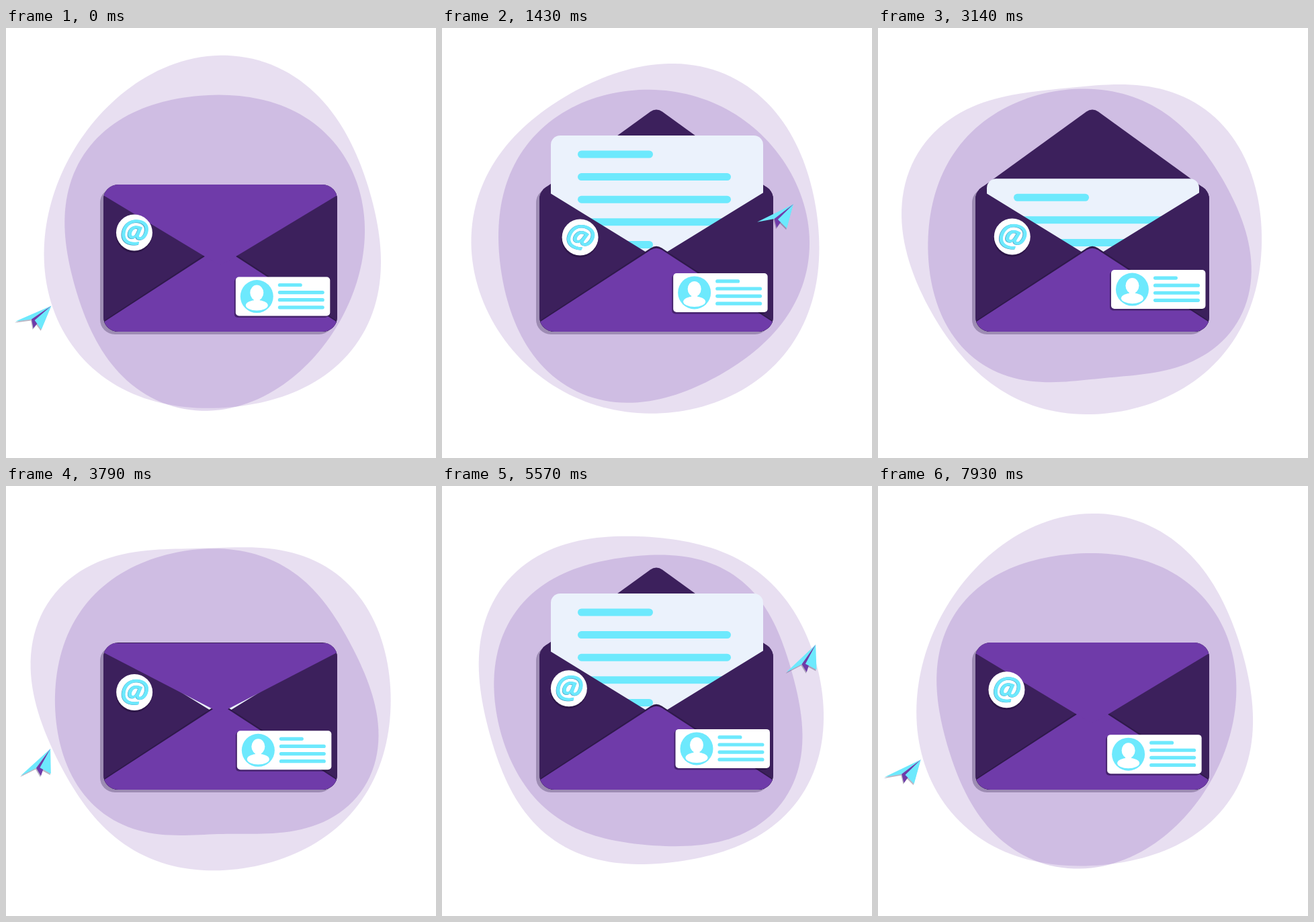
Recreate the animation shown at these times as an HTML page with a canvas. Size 640 px wide and 640 px high, loop 8 s.

```html
<!DOCTYPE html>
<html lang="en">
<head>
<meta charset="utf-8">
<title>Envelope</title>
<style>
html, body { margin: 0; width: 100%; height: 100%; overflow: hidden; background: #fff; }
canvas { display: block; width: 640px; height: 640px; }
</style>
</head>
<body>
<canvas id="stage" width="640" height="640"></canvas>
<script>
const ctx = document.getElementById('stage').getContext('2d');
const { sin, cos, PI } = Math;
const LOOP = 8000, CYCLE = 4000, FPS = 14;
const PURPLE = '#6f3ba9', DARK = '#3c205c', DEEP = '#2f194b', CYAN = '#6de9fd', PAPER = '#ebf2fc';
const SHADE = 'rgba(30,12,52,.5)', SOFT = 'rgba(60,45,85,.34)';

// Smooth step from 0 to 1 between times a and b.
function ease(t, a, b) {
  const p = Math.min(1, Math.max(0, (t - a) / (b - a)));
  return p * p * (3 - 2 * p);
}

function fill(color) {
  ctx.fillStyle = color;
  ctx.fill();
}

function polygon(color, points) {
  ctx.beginPath();
  points.forEach(([x, y]) => ctx.lineTo(x, y));
  ctx.closePath();
  fill(color);
}

function roundRect(color, x, y, w, h, r) {
  ctx.beginPath();
  ctx.roundRect(x, y, w, h, r);
  fill(color);
}

function ellipse(color, x, y, rx, ry = rx) {
  ctx.beginPath();
  ctx.ellipse(x, y, rx, ry, 0, 0, 7);
  fill(color);
}

function bar(x, y, w, h) {
  if (w > h) roundRect(CYAN, x, y - h / 2, w, h, h / 2);
}

// Triangle with a rounded tip at the middle of the envelope, on a base that reaches down to edge.
function flapShape(color, baseY, tipY, edge = baseY, left = 145) {
  const right = 638 - left;
  ctx.beginPath();
  ctx.moveTo(left, baseY);
  ctx.arcTo(319, tipY, right, baseY, 15);
  ctx.lineTo(right, baseY);
  ctx.lineTo(right, edge);
  ctx.lineTo(left, edge);
  ctx.closePath();
  fill(color);
}

// Circle bent by four slowly changing waves; turn rotates the whole outline.
function blob(a, size, turn, alpha) {
  const c = cos(a), s = sin(a), points = [];
  for (let i = 0; i < 180; i++) {
    const q = i * PI / 90, w = q - turn;
    const r = size + 3 * s
      - (2.3 + 4.2 * c - 1.5 * s) * sin(w)
      + (3 - 9.3 * c + s) * cos(2 * w) + (3 - 4.8 * c - 4.8 * s) * sin(2 * w)
      - (1.2 + c + 5.5 * s) * cos(3 * w) + (10 * c - 1.8 * s - 1) * sin(3 * w)
      + (2.2 * c + 1.8 * s - 3.2) * cos(4 * w) + (3.2 - 1.2 * c) * sin(4 * w);
    points.push([309 + r * cos(q), 319 + r * sin(q)]);
  }
  polygon(`rgba(111,59,169,${alpha})`, points);
}

// The nose follows an ellipse; the wing tips bank on the way out and turn for the way back.
function plane(t) {
  const a = 2 * PI * t / CYCLE + .183;
  const bank = Math.exp(-(((t - 560) / 330) ** 2));
  const turn = -2.6 * (ease(t, 1400, 2200) - ease(t, 3350, 3900));
  const left = [-54 + 8 * bank, 26 - 45 * bank], right = [-10 - 83 * bank, 36 - 12 * bank];
  const mix = (l, r) => [l * left[0] + r * right[0], l * left[1] + r * right[1]];
  const nose = [0, 0], leftRoot = mix(.48, .25), rightRoot = mix(.36, .37);
  const drop = .125 * (Math.hypot(...left) + Math.hypot(...right));
  const keel = [rightRoot[0] - 2, rightRoot[1] + drop];
  const faces = [[CYAN, nose, left, leftRoot], [PURPLE, nose, leftRoot, keel], [CYAN, nose, rightRoot, right]];
  ctx.save();
  ctx.translate(325 - 262 * cos(a), 297 + 126 * cos(a - .576));
  for (const shadow of [true, false]) {
    ctx.save();
    if (shadow) ctx.translate(-1, 2);
    ctx.rotate(turn);
    faces.forEach(([color, ...points]) => polygon(shadow ? SOFT : color, points));
    ctx.restore();
  }
  ctx.restore();
}

function letter(t) {
  const top = 237 - 77 * (ease(t, 600, 1150) - ease(t, 2720, 3290));
  roundRect(PAPER, 162, top, 316, 440 - top, [14, 14, 0, 0]);
  for (let i = 0; i < 5; i++) {
    const grow = ease(t, 560 + i * 70, 960 + i * 70) - ease(t, 3200, 3450);
    bar(202, top + 28 + 33.6 * i, (i % 4 ? 228 : 112) * grow, 11);
  }
}

function envelope(t) {
  const open = 2 * (ease(t, 80, 660) - ease(t, 3300, 3880)) - 1;
  roundRect(SOFT, 140, 238, 348, 218, 22);
  if (open > 0) flapShape(DARK, 240.5, 240.5 - 122.5 * open, 240.5, 150);
  roundRect(DARK, 145, 233, 348, 219, 22);
  letter(t);
  ctx.save();
  ctx.beginPath();
  ctx.roundRect(145, 233, 348, 219, 22);
  ctx.clip();
  polygon(DARK, [[145, 236], [319, 343], [493, 236], [493, 452], [145, 452]]);
  flapShape(DEEP, 436, 322, 452);
  flapShape(PURPLE, 438, 325, 452);
  if (open < 0) flapShape(PURPLE, 240 - 9 * open, 240 - 114 * open, 240 + 7 * open);
  ctx.restore();
}

function badge(a) {
  const sway = 7 * cos(a - .88) - 9.5 * cos(2 * a - .74) - 3 * cos(3 * a);
  ctx.save();
  ctx.translate(196.5 + sway, 304.5 + 7 * sin(a) + 2 * sin(2 * a) + 4 * sin(3 * a));
  ellipse(SHADE, -.5, 3, 27);
  ellipse('#fff', 0, 0, 27);
  ctx.rotate((14 + .9 * sway) * PI / 180);
  ctx.font = 'italic 700 48px "Open Sans", "Noto Sans", sans-serif';
  ctx.textAlign = 'center';
  ctx.fillStyle = '#3f8fb5';
  ctx.fillText('@', -.5, 14.9);
  ctx.fillStyle = CYAN;
  ctx.fillText('@', 0, 14.5);
  ctx.restore();
}

function card(a) {
  ctx.save();
  ctx.translate(343.8 + 4 * sin(3 * a) - 2 * cos(2 * a), 364 + 2.5 * cos(a) + 5 * cos(2 * a - .64));
  roundRect(SHADE, -2, 2, 140, 58.5, 5);
  roundRect('#fff', 0, 0, 140.5, 58, 5);
  ellipse(CYAN, 31.5, 29, 24.5);
  ellipse('#fff', 31.5, 23.5, 10, 11.5);
  roundRect('#fff', 27, 30, 9, 9, 1);
  ellipse('#fff', 31.5, 42.3, 16.5, 7.8);
  for (let i = 0; i < 4; i++) bar(63, 12 + 11.1 * i, i ? 69 : 36, 5.2);
  ctx.restore();
}

function draw(now) {
  // The picture steps at a fixed frame rate.
  const t = Math.floor(now * FPS / 1000 + .1) * 1000 / FPS % LOOP;
  const a = 2 * PI * t / LOOP, c = t % CYCLE;
  const behind = c > 2050 && c < 3900;
  ctx.clearRect(0, 0, 640, 640);
  blob(a, 257, 0, .16);
  blob(a, 229.5, PI, .2);
  if (behind) plane(c);
  envelope(c);
  badge(a);
  card(a);
  if (!behind) plane(c);
}

const start = performance.now();
function tick() {
  draw(performance.now() - start);
  requestAnimationFrame(tick);
}
tick();
</script>
</body>
</html>
```
